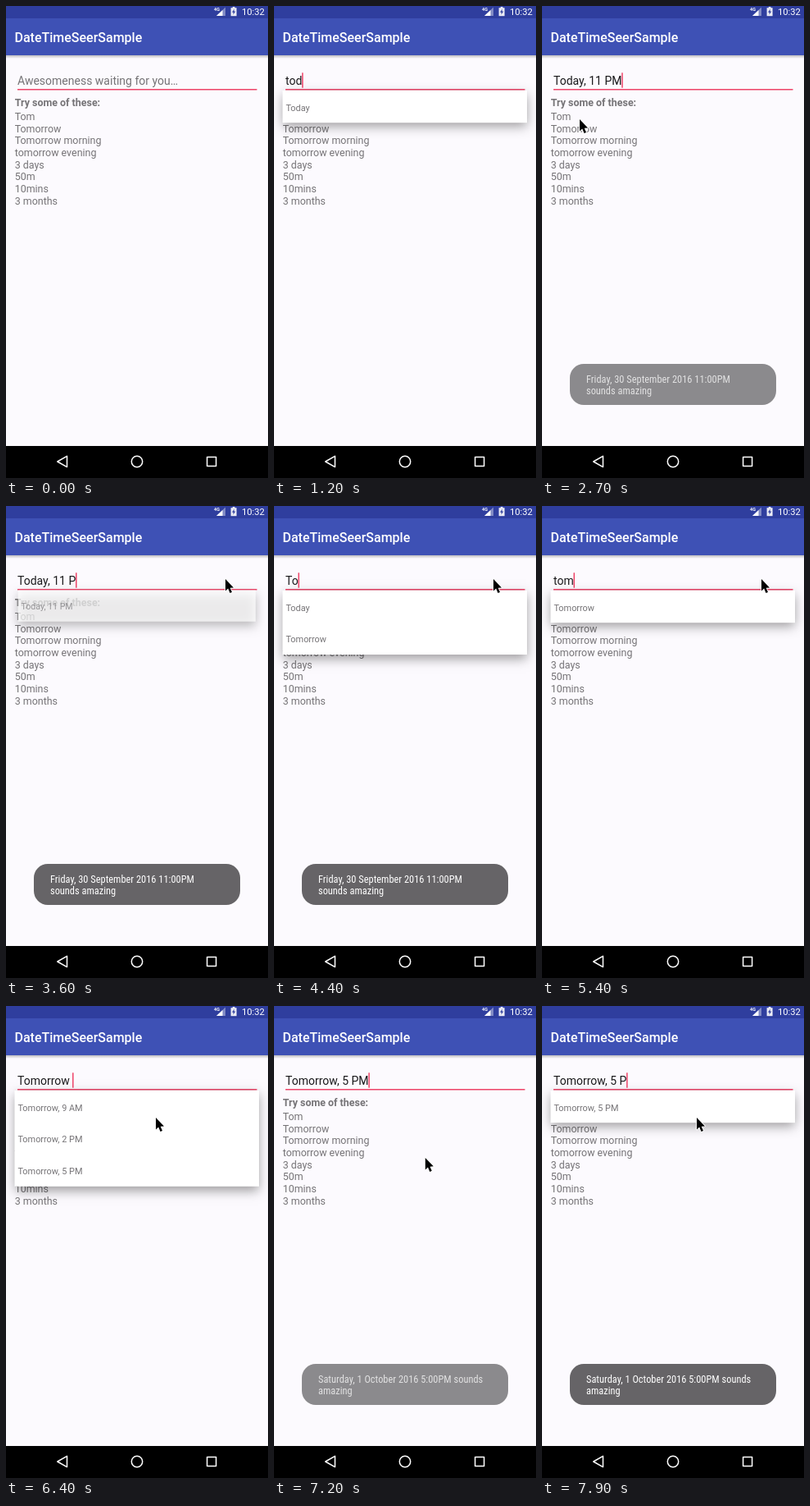
Write an HTML page with a canvas that moves like this. It is 320 px wide and 575 px high and loops after 8000 ms.

```html
<!DOCTYPE html>
<html lang="en">
<head>
<meta charset="utf-8">
<title>Date suggestions</title>
<style>
html, body { margin: 0; width: 100%; height: 100%; overflow: hidden; background: #fcfafe; }
canvas { display: block; width: 100vw; height: 100vh; }
</style>
</head>
<body>
<canvas id="stage"></canvas>
<script>
const W = 320, H = 575, LOOP = 8000, STEP = 100;
const canvas = document.getElementById('stage');
const ctx = canvas.getContext('2d');

const ACCENT = '#ee4468', GREY = '#757376', INK = '#1b1a1c';
const HINT = 'Awesomeness waiting for you…';
const TRIES = ['Tom', 'Tomorrow', 'Tomorrow morning', 'tomorrow evening',
  '3 days', '50m', '10mins', '3 months'];
const FIELD_FONT = roboto(14);

// What the field holds and which suggestions it opens, from a given time on.
const edits = [
  [-200, '', []],
  [700, 't', ['Today', 'Tomorrow']],
  [900, 'to', ['Today', 'Tomorrow']],
  [1200, 'tod', ['Today']],
  [2050, 'Today ', ['Today, 11 PM']],
  [2350, 'Today, 11 PM', []],
  [3500, 'Today, 11 P', ['Today, 11 PM']],
  ...eraseFrom('Today, 11 ', 4000, 50),
  [4900, 't', ['Today', 'Tomorrow']],
  [5100, 'to', ['Today', 'Tomorrow']],
  [5300, 'tom', ['Tomorrow']],
  [5500, 'tomo', ['Tomorrow']],
  [6250, 'Tomorrow ', ['Tomorrow, 9 AM', 'Tomorrow, 2 PM', 'Tomorrow, 5 PM']],
  [6850, 'Tomorrow, 5 PM', []],
  [7650, 'Tomorrow, 5 P', ['Tomorrow, 5 PM']]
];

const toasts = [
  { from: 2550, to: 4650, lines: ['Friday, 30 September 2016 11:00PM', 'sounds amazing'] },
  { from: 7050, to: 9000, lines: ['Saturday, 1 October 2016 5:00PM sounds', 'amazing'] }
];

// Pointer stops: time, x, y.
const stops = [
  [1700, 130, 138], [2000, 58, 120], [2400, 52, 121], [2600, 46, 138], [2700, 46, 138],
  [3400, 268, 89], [5600, 268, 89], [6100, 165, 115], [6200, 165, 115],
  [6400, 183, 136], [6750, 182, 194], [7100, 184, 194], [7500, 189, 136]
];

function roboto(size, weight = 400) {
  return `${weight} ${size}px Roboto, sans-serif`;
}

function eraseFrom(text, start, gap) {
  const list = [];
  for (let n = text.length; n >= 0; n--) {
    const rest = text.slice(0, n);
    const items = n > 7 ? ['Today, 11 PM'] : n > 2 ? ['Today'] : n ? ['Today', 'Tomorrow'] : [];
    list.push([start + (text.length - n) * gap, rest, items]);
  }
  return list;
}

const clamp = v => Math.max(0, Math.min(1, v));
const smooth = p => p * p * (3 - 2 * p);

function label(text, x, y, font, color) {
  ctx.font = font;
  ctx.fillStyle = color;
  ctx.fillText(text, x, y);
}

function rect(x, y, w, h, color) {
  ctx.fillStyle = color;
  ctx.fillRect(x, y, w, h);
}

function poly(points) {
  ctx.beginPath();
  points.forEach(([x, y]) => ctx.lineTo(x, y));
  ctx.closePath();
}

function fillPoly(points, color) {
  poly(points);
  ctx.fillStyle = color;
  ctx.fill();
}

function drawBars() {
  rect(0, 0, W, 15, '#2f3e9e');
  rect(0, 15, W, 45, '#3e51b5');
  const shade = ctx.createLinearGradient(0, 60, 0, 64);
  shade.addColorStop(0, 'rgba(0,0,0,.25)');
  shade.addColorStop(1, 'rgba(0,0,0,0)');
  rect(0, 60, W, 4, shade);
  label('DateTimeSeerSample', 10.5, 44.3, roboto(16, 500), '#fff');

  label('4G', 254, 5.6, roboto(5.5, 700), '#fff');
  fillPoly([[268, 1.5], [268, 12], [257, 12]], 'rgba(255,255,255,.4)');
  fillPoly([[264.5, 5], [264.5, 12], [257, 12]], '#fff');
  rect(276.8, 1, 2.6, 1.5, '#fff');
  rect(274.6, 2.2, 7, 10, 'rgba(255,255,255,.9)');
  fillPoly([[278.8, 3.6], [276, 7.8], [277.8, 7.8], [277.4, 10.8], [280.2, 6.6], [278.4, 6.6]], '#2f3e9e');
  label('10:32', 288, 11, roboto(11.2), '#fff');

  rect(0, 536, W, 39, '#000');
  ctx.strokeStyle = '#fff';
  ctx.lineWidth = 1.5;
  ctx.lineJoin = 'round';
  poly([[62.8, 555], [74.5, 548.4], [74.5, 561.6]]);
  ctx.stroke();
  ctx.beginPath();
  ctx.arc(160, 555, 6.7, 0, Math.PI * 2);
  ctx.stroke();
  ctx.strokeRect(245.6, 549.6, 11, 11);
}

function drawPage() {
  rect(0, 0, W, H, '#fcfafe');
  label('Try some of these:', 10.7, 121.8, roboto(12.45, 700), GREY);
  TRIES.forEach((line, i) => label(line, 10.7, 138.8 + 14.72 * i, roboto(12.45), GREY));
}

function drawField(t, text, since) {
  rect(14, 101, 292.5, 1.5, ACCENT);
  label(text || HINT, 14, 96, FIELD_FONT, text ? INK : GREY);
  const caretOn = t >= 300 && (since % 1000) < 500;
  if (caretOn) rect(14 + ctx.measureText(text).width - (text ? 0.2 : 0.4), 81.3, 1.5, 18.4, ACCENT);
}

function drawPopup(items, shown, scale) {
  ctx.save();
  ctx.globalAlpha = shown;
  ctx.translate(160, 90);
  ctx.scale(scale, scale);
  ctx.translate(-160, -90);
  ctx.save();
  const k = canvas.width / W;
  ctx.shadowColor = 'rgba(0,0,0,.38)';
  ctx.shadowBlur = 13 * k;
  ctx.shadowOffsetY = 5 * k;
  rect(10.5, 103, 298.5, items.length * 38.8 + 0.4, '#fff');
  ctx.restore();
  items.forEach((item, i) => label(item, 14.4, 127.5 + 38.7 * i, roboto(10.9), GREY));
  ctx.restore();
}

// Popup fades and grows when the list opens, fades out when it closes.
function popupAt(t, index) {
  const items = edits[index][2];
  let first = index;
  while (first > 0 && !edits[first - 1][2].length === !items.length) first--;
  const p = clamp((t - edits[first][0]) / 150);
  const eased = 1 - (1 - p) * (1 - p * 0.25);
  if (items.length) drawPopup(items, eased, 0.9 + 0.1 * eased);
  else if (first > 0 && p < 1) drawPopup(edits[first - 1][2], 1 - p, 1);
}

function toastFont() {
  const face = size => `condensed ${size}px "Roboto Condensed", Roboto, sans-serif`;
  ctx.font = face(12.4);
  const narrow = ctx.measureText(toasts[0].lines[0]).width < 190;
  return narrow ? ctx.font : face(11.2);
}

function drawToast(t, { from, to, lines }) {
  const alpha = Math.min(clamp((t - from) / 200), 1 - clamp((t - to) / 300));
  if (!alpha) return;
  ctx.save();
  ctx.globalAlpha = alpha;
  ctx.beginPath();
  ctx.roundRect(34, 436, 252, 50, 17);
  ctx.fillStyle = '#666467';
  ctx.fill();
  const font = toastFont();
  lines.forEach((line, i) => label(line, 54, 458.8 + 14.6 * i, font, '#fff'));
  ctx.restore();
}

function drawPointer(t) {
  if (t < stops[0][0]) return;
  let i = 0;
  while (i < stops.length - 1 && stops[i + 1][0] <= t) i++;
  const [t0, x0, y0] = stops[i];
  const [t1, x1, y1] = stops[i + 1] || [t0 + 1, x0, y0];
  const p = smooth(clamp((t - t0) / (t1 - t0)));
  ctx.save();
  ctx.translate(x0 + (x1 - x0) * p, y0 + (y1 - y0) * p);
  poly([[0, 0], [0, 14.6], [3.2, 11.6], [5.5, 17], [8, 15.9], [5.7, 10.7], [10, 10.4]]);
  ctx.strokeStyle = '#fff';
  ctx.lineWidth = 1.6;
  ctx.stroke();
  ctx.fillStyle = '#000';
  ctx.fill();
  ctx.restore();
}

function draw(t) {
  const index = edits.findLastIndex(e => e[0] <= t);
  const [since, text] = edits[index];
  drawPage();
  drawBars();
  drawField(t, text, t - since);
  popupAt(t, index);
  toasts.forEach(toast => drawToast(t, toast));
  drawPointer(t);
}

function frame() {
  const dpr = window.devicePixelRatio || 1;
  const w = Math.round(innerWidth * dpr), h = Math.round(innerHeight * dpr);
  if (canvas.width !== w || canvas.height !== h) {
    canvas.width = w;
    canvas.height = h;
  }
  ctx.setTransform(w / W, 0, 0, h / H, 0, 0);
  const t = performance.now() % LOOP;
  draw(Math.floor(t / STEP) * STEP);
  requestAnimationFrame(frame);
}
frame();
</script>
</body>
</html>
```
